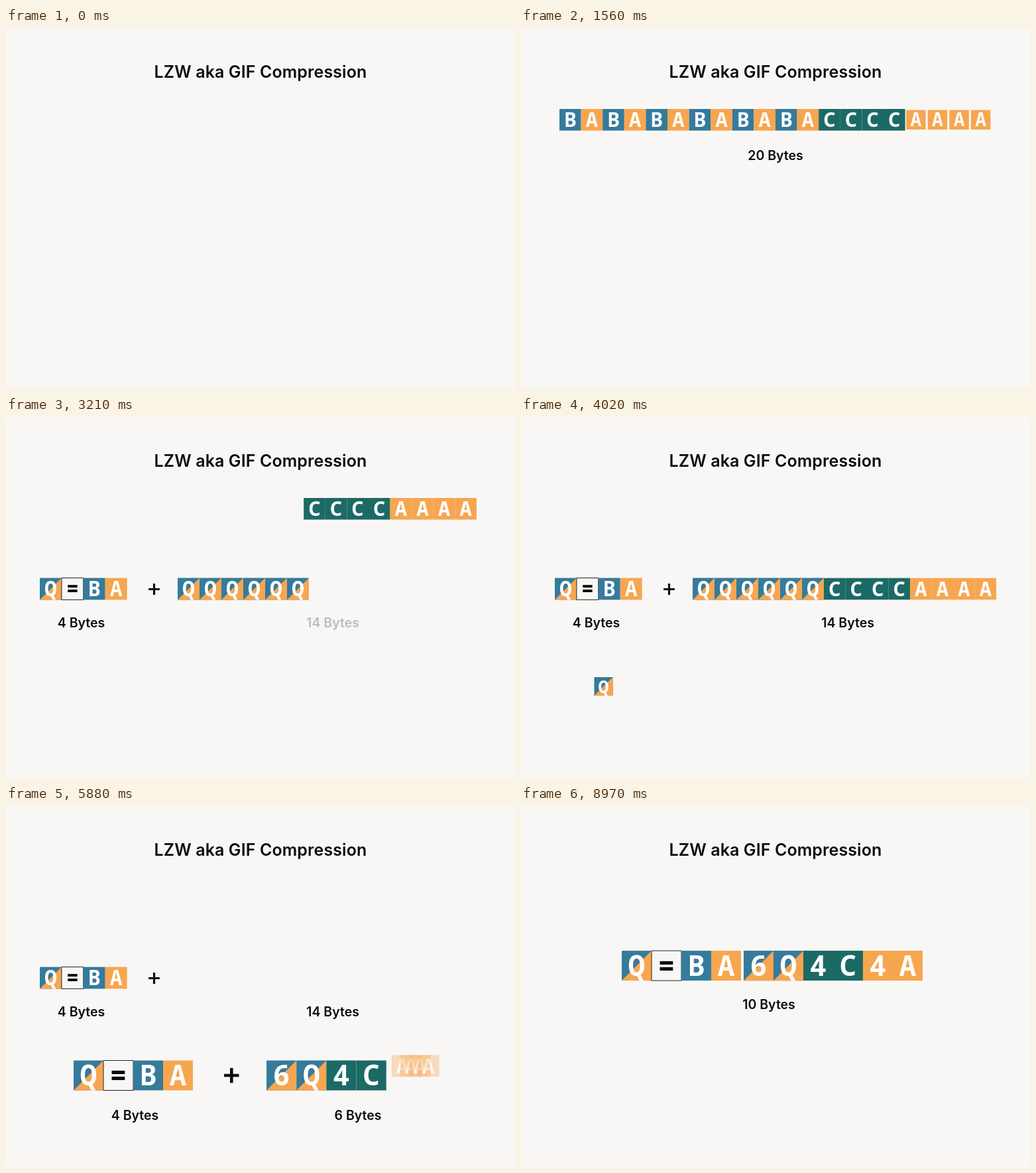
An HTML page for the animation above (9 s loop, 768 by 544 pixels).

```html
<!DOCTYPE html>
<html lang="en">
<head>
<meta charset="utf-8">
<title>LZW compression</title>
<style>
  html, body { margin: 0; width: 100%; height: 100%; overflow: hidden; background: #f8f7f5; }
  svg { display: block; width: 768px; height: 544px; }
  text { text-anchor: middle; fill: #0c0c0c; }
  .title { font: 600 25px Inter, sans-serif; letter-spacing: .1px; }
  .label { font: 600 19.5px Inter, sans-serif; }
  .glyph { font: 700 43px "Noto Sans Mono", monospace; fill: #fff; }
  .dark { fill: #0c0c0c; }
</style>
</head>
<body>
<svg id="stage" viewBox="0 0 768 544">
  <text class="title" x="384" y="75">LZW aka GIF Compression</text>
</svg>
<script>
const LOOP = 9000, UNIT = 45;
const BLUE = '#357b9c', ORANGE = '#f7a650', TEAL = '#1c6a66';
const stage = document.getElementById('stage');
const parts = [];

const out = p => 1 - (1 - p) ** 3;
const inOut = p => p < .5 ? 4 * p ** 3 : 1 - 4 * (1 - p) ** 3;
const mix = (a, b, p) => a + (b - a) * p;

function make(tag, attrs, parent, text) {
  const node = document.createElementNS('http://www.w3.org/2000/svg', tag);
  for (const k in attrs) node.setAttribute(k, attrs[k]);
  if (text) node.textContent = text;
  parent.append(node);
  return node;
}

// Each key is [time, x, y, scale, opacity, easing into this key].
function part(keys) {
  const node = make('g', { visibility: 'hidden' }, stage);
  parts.push({ node, keys });
  return node;
}

function tile(char, fill, keys) {
  const g = part(keys.map(([t, x, y, s, ...rest]) => [t, x, y, s / UNIT, ...rest]));
  const h = UNIT / 2, box = { x: -h, y: -h, width: UNIT, height: UNIT };
  if (char === '=') {
    make('rect', { ...box, fill: '#f8f7f5', stroke: '#222', 'vector-effect': 'non-scaling-stroke' }, g);
  } else {
    make('rect', { ...box, fill: fill === 'split' ? BLUE : fill }, g);
    if (fill === 'split') make('path', { d: `M${-h} ${h}H${h}V${-h}Z`, fill: ORANGE }, g);
  }
  make('text', { class: char === '=' ? 'glyph dark' : 'glyph', y: 15.4 }, g, char);
}

const label = (text, keys) => make('text', { class: 'label' }, part(keys), text);

const plus = (size, width, keys) => make('path', {
  d: `M${-size} 0H${size}M0 ${-size}V${size}`, stroke: '#0c0c0c', 'stroke-width': width
}, part(keys));

const pop = (t, x, y, s, d = 300) => [[t, x, y, 0, 1], [t + d, x, y, s, 1, out]];
const fadeIn = (t, x, y, d = 220) => [[t, x, y, 1, 0], [t + d, x, y, 1, 1]];
const fadeOut = (t, x, y, s, d) => [[t, x, y, s, 1], [t + d, x, y, s, 0]];
const fly = (t, d, x0, y0, x1, y1, s, a = 0) => [[t, x0, y0, s, 1], [t + d, x1, y1, s, a]];

const S = 32.6, BIG = 45.1;
const TOP = 138.3, MID = 259, LOW = 406, END = 240.6;
const CLEAR = 6180, MOVE = 6360, MOVE_TIME = 460;
const topX = i => 58 + S * (i + .5);
const runX = i => 457 + 32.5 * (i + .5);
const codeX = i => 259 + 33 * (i + .5);
const rule = [['Q', 'split'], ['=', ''], ['B', BLUE], ['A', ORANGE]];
const packed = [['6', 'split'], ['Q', 'split'], ['4', TEAL], ['C', TEAL], ['4', ORANGE], ['A', ORANGE]];

// Twelve alternating bytes collapse into six codes.
for (let i = 0; i < 12; i++) {
  const pair = i >> 1, x = topX(i);
  tile(i % 2 ? 'A' : 'B', i % 2 ? ORANGE : BLUE, [
    ...pop(20 + pair * 100, x, TOP, S),
    ...fly(2710, 350, x, TOP, codeX(pair), MID, S)
  ]);
}
for (let i = 0; i < 6; i++) {
  tile('Q', 'split', [
    ...pop(2970, codeX(i), MID, 33, 200),
    ...fly(4550, 370, codeX(i), MID, 438 + (i - 2.5) * 11, LOW, 33)
  ]);
}

// Runs of C and A drop one row, then gather into a count and a letter.
for (let i = 0; i < 8; i++) {
  const isA = i > 3, x = topX(i + 12);
  const goal = (isA ? 614 : 529) + (i % 4 - 1.5) * 11;
  tile(isA ? 'A' : 'C', isA ? ORANGE : TEAL, [
    ...pop(isA ? 1400 : 720, x, TOP, S),
    ...fly(3540, 440, x, TOP, runX(i), MID, S, 1),
    ...fly(isA ? 5590 : 5070, isA ? 410 : 370, runX(i), MID, goal, LOW, S)
  ]);
}

rule.forEach(([char, fill], i) => {
  const x = 51 + 32.9 * (i + .5);
  tile(char, fill, [...pop(1940 + i * 80, x, MID, 32.9, 220), ...fadeOut(CLEAR, x, MID, 32.9, 180)]);
});
rule.forEach(([char, fill], i) => {
  const x = 102 + 45 * (i + .5);
  tile(char, fill, [...pop(3960 + i * 70, x, LOW, 45, 220), ...fly(MOVE, MOVE_TIME, x, LOW, x + 50, END, 45, 1)]);
});
packed.forEach(([char, fill], i) => {
  const [start, time] = [[4905, 180], [5360, 180], [5890, 110]][i >> 1];
  const x = 393 + 45.2 * (i + .5);
  tile(char, fill, [
    ...pop(start, x, LOW, BIG, time),
    ...fly(MOVE, MOVE_TIME, x, LOW, 336 + 45 * (i + .5), END, BIG, 1)
  ]);
});

plus(8.4, 3.2, [...pop(2700, 223.5, MID + .5, 1, 220), ...fadeOut(CLEAR, 223.5, MID + .5, 1, 180)]);
plus(11.2, 4.6, [...pop(4220, 340.3, LOW, 1, 220), ...fadeOut(MOVE, 340.3, LOW, 1, MOVE_TIME)]);

label('20 Bytes', [...fadeIn(300, 384, 198.5, 400), ...fadeOut(1950, 384, 198.5, 1, 250)]);
label('4 Bytes', [...fadeIn(2290, 113.5, 317), ...fadeOut(CLEAR, 113.5, 317, 1, 180)]);
label('14 Bytes', [...fadeIn(3120, 493, 317, 230), ...fadeOut(CLEAR, 493, 317, 1, 180)]);
label('4 Bytes', [...fadeIn(4160, 194.5, 472.8), ...fadeOut(MOVE, 194.5, 472.8, 1, MOVE_TIME)]);
label('6 Bytes', [...fadeIn(4310, 531, 472.8), ...fadeOut(MOVE, 531, 472.8, 1, MOVE_TIME)]);
label('10 Bytes', fadeIn(6820, 374, 305.5, 280));

function pose(keys, t) {
  if (t < keys[0][0]) return null;
  const n = keys.findIndex(k => k[0] > t);
  if (n < 0) return keys[keys.length - 1].slice(1, 5);
  const a = keys[n - 1], b = keys[n];
  const p = (b[5] || inOut)((t - a[0]) / (b[0] - a[0]));
  const moves = a[1] !== b[1] || a[2] !== b[2];
  // Travelling parts stay solid until late in their flight.
  return [1, 2, 3, 4].map(i => mix(a[i], b[i], i === 4 && moves ? p ** 4 : p));
}

function render(t) {
  for (const { node, keys } of parts) {
    const now = pose(keys, t);
    const shown = now && now[2] > 0 && now[3] > 0;
    node.setAttribute('visibility', shown ? 'visible' : 'hidden');
    if (!shown) continue;
    const [x, y, s, a] = now;
    node.setAttribute('transform', `translate(${x} ${y}) scale(${s})`);
    node.setAttribute('opacity', a);
  }
}

const start = performance.now();
function frame() {
  render((performance.now() - start) % LOOP);
  requestAnimationFrame(frame);
}
render(0);
requestAnimationFrame(frame);
</script>
</body>
</html>
```
